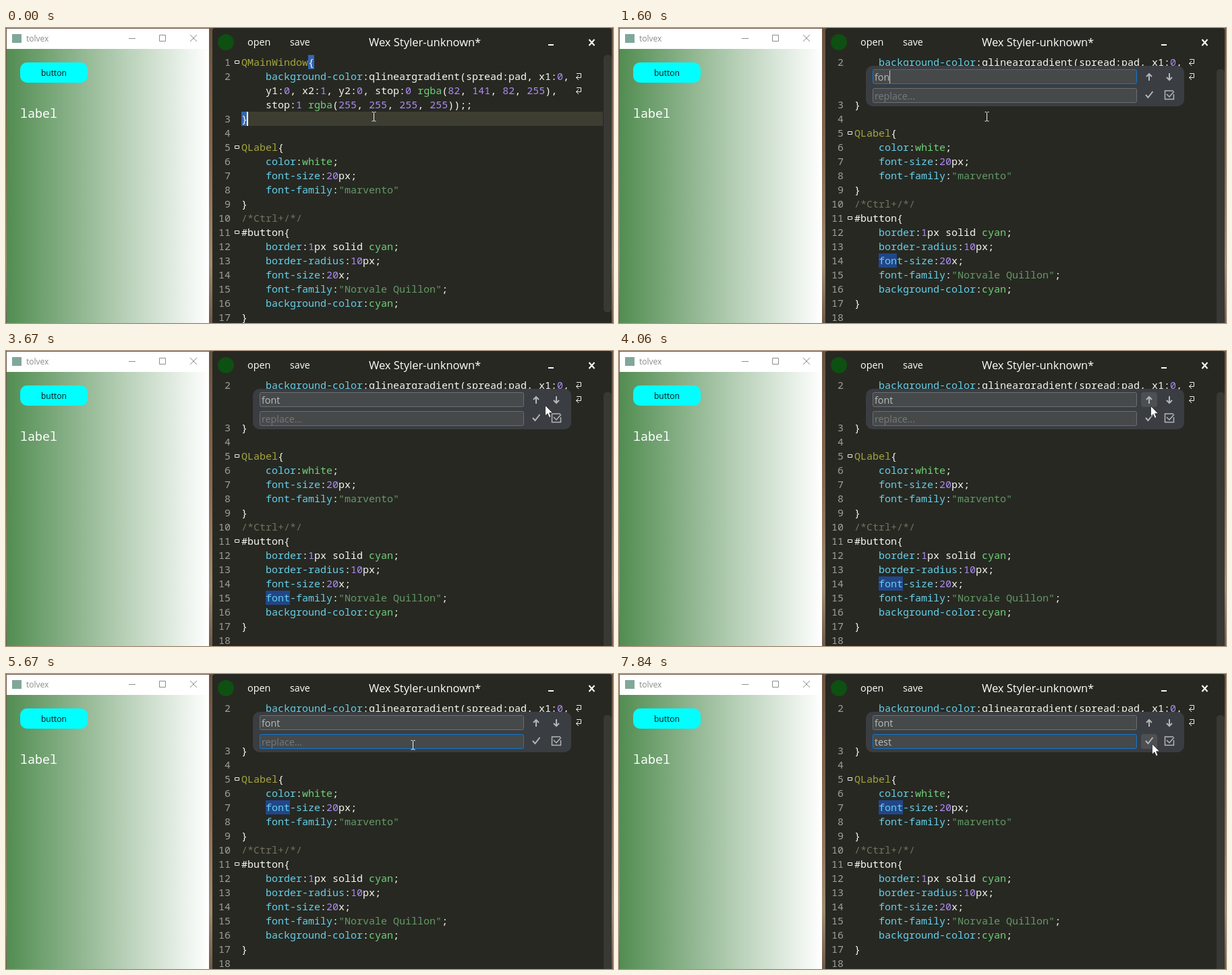
Recreate the animation shown at these times as an HTML page. Size 900 by 437 pixels, loop 8000 ms.

```html
<!DOCTYPE html>
<html lang="en">
<head>
<meta charset="utf-8">
<title>Style editor</title>
<style>
html, body { margin: 0; width: 100%; height: 100%; overflow: hidden; background: #272822; }
svg { display: block; }
text { white-space: pre; }
.ui { font-family: "Open Sans", "Noto Sans", sans-serif; }
.mono { font: 15px "Noto Sans Mono", "DejaVu Sans Mono", monospace; fill: #f8f8f2; }
.num { fill: #a0a09a; text-anchor: end; }
.sel { fill: #a6a63c; }
.prop { fill: #66d0ea; }
.val { fill: #70d178; }
.lit { fill: #ae8cf5; }
.str { fill: #649a67; }
.note { fill: #75715e; }
.field { fill: #45494a; stroke: #6c6f71; }
.field.focus { stroke: #0f78d0; }
.input { font-size: 14.3px; fill: #bcbcbc; }
.input.empty { fill: #777b7d; }
.line { fill: none; stroke: #f0f0f0; }
.icon { fill: none; stroke: #b4b6b8; stroke-width: 2; }
</style>
</head>
<body>
<svg width="900" height="437" viewBox="0 0 900 437">
  <defs>
    <linearGradient id="fade">
      <stop stop-color="#528d52"/><stop offset="1" stop-color="#fff"/>
    </linearGradient>
    <linearGradient id="desk" x2="0" y2="1">
      <stop stop-color="#6a5342"/><stop offset=".45" stop-color="#866a50"/>
      <stop offset=".8" stop-color="#a18c72"/><stop offset="1" stop-color="#6f5a48"/>
    </linearGradient>
  </defs>
  <rect width="900" height="437" fill="url(#desk)"/>

  <g class="ui">
    <rect x="1" y="1" width="300" height="30" fill="#fff"/>
    <rect x="1" y="31" width="300" height="406" fill="url(#fade)"/>
    <rect x="9" y="9" width="14" height="13" fill="#7fa79a"/>
    <text x="30" y="20" font-size="12" fill="#8a8a8a">tolvex</text>
    <path d="M182 15.5h10M227.5 10.5h9v9h-9zM273 10l10 10M283 10l-10 10" fill="none" stroke="#8c8c8c"/>
    <rect x="21" y="51" width="100" height="30" rx="10" fill="#0ff"/>
    <text x="52" y="71" font-size="12" fill="#111">button</text>
    <text x="21" y="133" class="mono" style="font-size:18.33px;fill:#fff">label</text>
  </g>

  <path d="M306 437V4q0-4 4-4H894q4 0 4 4V437z" fill="#272822"/>
  <g class="ui" fill="#fff">
    <circle cx="326" cy="21" r="12" fill="#0e4f12"/>
    <text x="358" y="26" font-size="14.4">open</text>
    <text x="421" y="26" font-size="14.2">save</text>
    <text x="538" y="27" font-size="16.5">Wex Styler-unknown*</text>
    <path d="M804 25h8M864.5 17l8 9M872.5 17l-8 9" stroke="#fff" stroke-width="2"/>
  </g>

  <rect id="bar" x="886" y="40" width="12" height="381" rx="5" fill="#383834"/>
  <rect id="current" x="349" y="124" width="536" height="21" fill="#3e3d32"/>
  <path id="braces" d="M448 40h9v21h-9zM349 124h9v21h-9z" fill="#3566b0"/>
  <rect id="match" x="385" height="21" fill="#21468a"/>
  <g id="code"></g>
  <rect id="caret" x="357" y="124" width="2" height="21" fill="#fff"/>

  <g id="panel" class="ui">
    <rect x="366" y="56" width="472" height="60" rx="10" fill="#3a3d41"/>
    <rect id="hover" width="24" height="22" rx="4" fill="#4d5053"/>
    <rect class="field" x="376.5" y="61.5" width="391" height="21" rx="2"/>
    <rect class="field" x="376.5" y="89.5" width="391" height="21" rx="2"/>
    <text class="input" x="379" y="78"></text>
    <text class="input" x="379" y="106"></text>
    <rect id="blink" width="1" height="19" fill="#d0d0d0"/>
    <path class="icon" d="M786 78V68M782 72l4-4 4 4M816 67v10M812 73l4 4 4-4M781 99l3.5 4 7-9"/>
    <path class="icon" style="stroke-width:1.5" d="M822 93H809.500V105.500H822.500V98M812 98l4 4 7-8"/>
  </g>

  <circle id="press" r="12" fill="#ccc51c" fill-opacity=".75"/>
  <path id="arrow" d="M.5 .5V16L4 12.700L6.500 18.500L9 17.400L6.600 11.700H11.500Z" fill="#fff" stroke="#222" stroke-width=".8"/>
  <path id="beam" class="line" d="M-3 -6.500H-1L0 -5.500L1 -6.500H3M0 -5.500V6M-3 7H-1L0 6L1 7H3"/>
</svg>

<script>
const $ = id => document.getElementById(id);
const LOOP = 8000, ROW = 21;

// [line number, text]; wrapped rows have no number
const rows = [
  [1, 'QMainWindow{'],
  [2, '    background-color:qlineargradient(spread:pad, x1:0,'],
  [0, '    y1:0, x2:1, y2:0, stop:0 rgba(82, 141, 82, 255),'],
  [0, '    stop:1 rgba(255, 255, 255, 255));;'],
  [3, '}'], [4, ''],
  [5, 'QLabel{'],
  [6, '    color:white;'],
  [7, '    font-size:20px;'],
  [8, '    font-family:"marvento"'],
  [9, '}'],
  [10, '/*Ctrl+/*/'],
  [11, '#button{'],
  [12, '    border:1px solid cyan;'],
  [13, '    border-radius:10px;'],
  [14, '    font-size:20x;'],
  [15, '    font-family:"Norvale Quillon";'],
  [16, '    background-color:cyan;'],
  [17, '}'], [18, '']
];

const tokens = /(\/\*.*)|("[^"]*")|(^Q\w+)|(^[a-z-]+(?=:))|\b(rgba|white|cyan)\b|\b(\d+)/g;
const kinds = ['note', 'str', 'sel', 'prop', 'val', 'lit'];

function paint(text, wrapped) {
  return text.replace(tokens, (m, ...g) => {
    const kind = kinds[g.slice(0, 6).findIndex(Boolean)];
    return wrapped && kind === 'prop' ? m : `<tspan class="${kind}">${m}</tspan>`;
  });
}

function buildRow([num, text], i) {
  const y = 40 + ROW * i, body = text.trim();
  let out = `<text class="mono" x="${body === text ? 349 : 385}" y="${y + 16}">${paint(body, !num)}</text>`;
  if (num) out += `<text class="mono num" x="333" y="${y + 16}">${num}</text>`;
  if (/\{$/.test(text)) out += `<path class="line" d="M339.500 ${y + 8.5}h6v4h-6z"/>`;
  if (/,$/.test(text)) out += `<path class="line" d="M846 ${y + 27 - ROW}.500h6.500v6h-7M849 ${y + 9}l-3.500 3.500 3.500 3.500"/>`;
  return out;
}
$('code').innerHTML = rows.map(buildRow).join('');

const fields = [...document.querySelectorAll('.field')];
const inputs = [...document.querySelectorAll('.input')];

// Timelines: [start, value...]
const matches = [[0, 0, 0], [1370, 7, 1], [1520, 8, 2], [1600, 14, 3], [1750, 15, 4],
  [4060, 14, 4], [4440, 8, 4], [4980, 7, 4]];
const typed = [
  [[0, ''], [1370, 'f'], [1520, 'fo'], [1600, 'fon'], [1750, 'font']],
  [[0, ''], [6770, 't'], [6845, 'te'], [6920, 'tes'], [7100, 'test']]
];
const focus = [[0, -1], [300, 0], [3050, -1], [5600, 1]];
const blinks = [[0, 0], [300, 1], [910, 0], [1370, 1], [2280, 0], [2810, 1], [3050, 0],
  [5750, 1], [6260, 0], [6770, 1], [7630, 0]];
const presses = [3050, 3980, 4360, 4900];

// Pointer moves: [first step, last step, steps, x, y]
const moves = [
  [2210, 2595, 6, 881, 100], [2672, 2980, 5, 822, 73], [3440, 3440, 1, 823, 74],
  [3590, 3670, 2, 799, 80], [3750, 3910, 3, 788, 81], [5210, 5360, 3, 801, 80],
  [5530, 5670, 3, 603, 105], [5750, 5830, 2, 568, 112], [6000, 6070, 2, 566, 111],
  [6220, 6220, 1, 574, 112], [6300, 6300, 1, 568, 111], [6620, 6620, 1, 569, 111],
  [7100, 7480, 6, 715, 110], [7550, 7840, 5, 790, 103]
];

const at = (list, t) => list.filter(e => e[0] <= t).pop();
const show = (el, on) => el.setAttribute('visibility', on ? 'visible' : 'hidden');
const place = (el, x, y) => el.setAttribute('transform', `translate(${x} ${y})`);
const inside = (x, y, l, t, r, b) => x >= l && x < r && y >= t && y < b;

function pointer(t) {
  let x = 545, y = 131;
  for (const [a, b, n, tx, ty] of moves) {
    if (t < a) break;
    const step = n > 1 ? Math.floor((t - a) / (b - a) * (n - 1) + 1.001) : 1;
    const p = Math.min(step, n) / n;
    x += (tx - x) * p;
    y += (ty - y) * p;
  }
  return [Math.round(x), Math.round(y)];
}

function render(t) {
  const scrolled = t >= 1600;
  $('code').setAttribute('transform', `translate(0 ${scrolled ? -ROW : 0})`);
  [...$('code').children].forEach(el => {
    const first = el.getAttribute('y') === '56' || /M339.500 48/.test(el.getAttribute('d'));
    show(el, !(scrolled && first));
  });
  $('bar').setAttribute('y', scrolled ? 61 : 40);
  show($('current'), t < 300);
  show($('caret'), t < 130);
  show($('braces'), t < 1370);

  const [, line, len] = at(matches, t);
  $('match').setAttribute('y', 40 + ROW * (line + 1 - scrolled));
  $('match').setAttribute('width', 9 * len);

  const open = t >= 300, active = at(focus, t)[1];
  $('panel').setAttribute('display', open ? 'inline' : 'none');
  ['find', 'replace...'].forEach((hint, i) => {
    const value = at(typed[i], t)[1];
    inputs[i].textContent = value || hint;
    inputs[i].classList.toggle('empty', !value);
    fields[i].classList.toggle('focus', active === i);
    if (open && active === i) {
      const w = value ? inputs[i].getComputedTextLength() : 0;
      place($('blink'), Math.round(379 + w), 63 + 28 * i);
    }
  });
  show($('blink'), open && active >= 0 && at(blinks, t)[1]);

  const [x, y] = pointer(t);
  const col = [774, 804].find(l => x >= l && x < l + 24);
  const row = [61, 89].find(r => y >= r && y < r + 22);
  show($('hover'), open && col && row);
  if (col && row) place($('hover'), col, row);

  const onField = inside(x, y, 376, 61, 768, 83) || inside(x, y, 376, 89, 768, 113);
  const asBeam = onField || !inside(x, y, 366, 56, 838, 116);
  show($('beam'), asBeam);
  show($('arrow'), !asBeam);
  place($('beam'), x + .5, y);
  place($('arrow'), x, y);
  show($('press'), presses.some(p => t >= p && t < p + 80));
  place($('press'), x - 1, y - 1);
}

const start = performance.now();
function tick() {
  render((performance.now() - start) % LOOP);
  requestAnimationFrame(tick);
}
tick();
</script>
</body>
</html>
```
